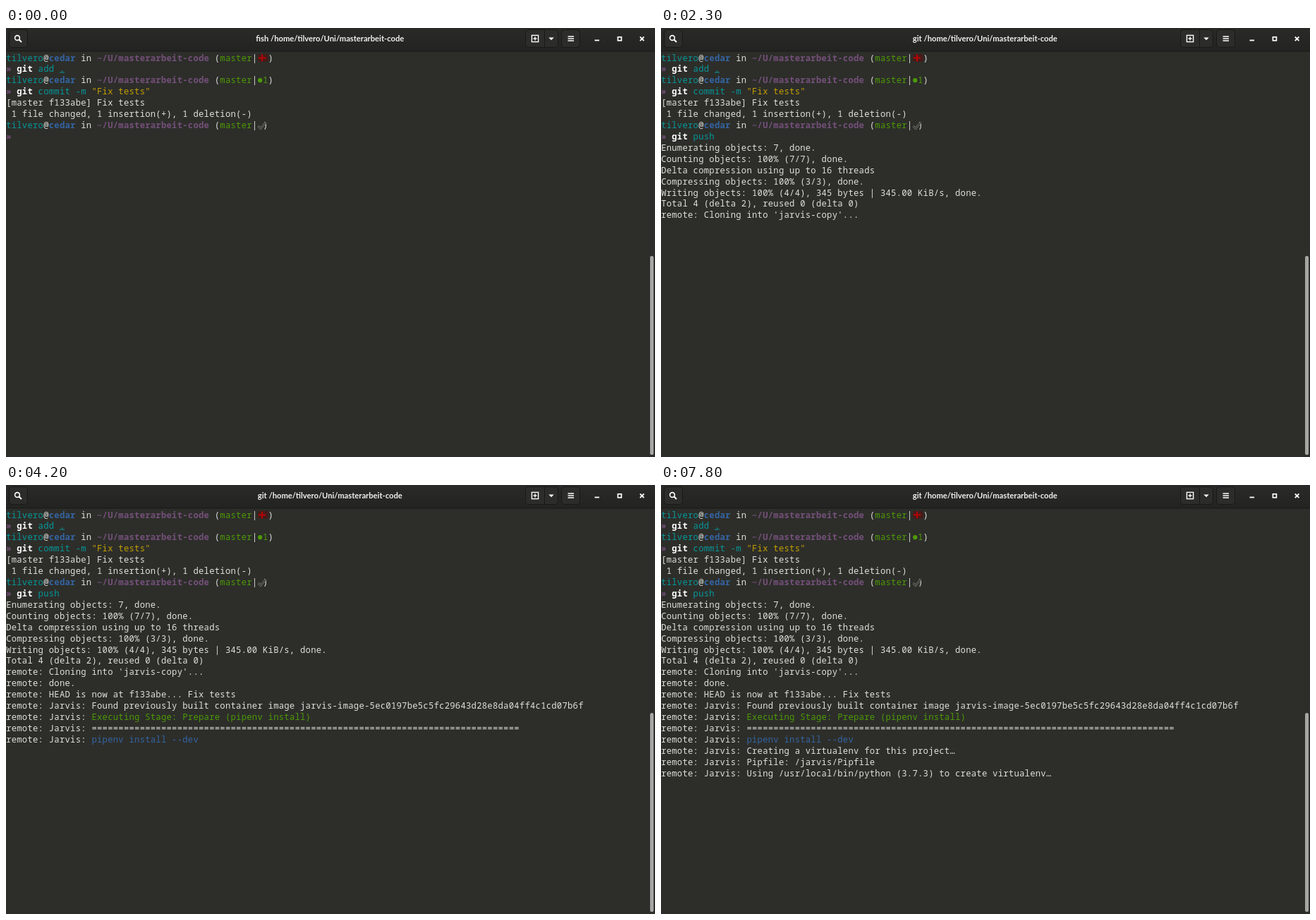
An HTML page with a canvas that plays this animation: 920x608 px, repeating every 8 s.

```html
<!DOCTYPE html>
<html lang="en">
<head>
<meta charset="utf-8">
<title>Terminal</title>
<style>
  html, body { margin: 0; width: 920px; height: 608px; overflow: hidden; background: #2d2e2a; }
  canvas { display: block; }
</style>
</head>
<body>
<canvas id="stage" width="920" height="608"></canvas>
<script>
const ctx = document.getElementById('stage').getContext('2d');
const LOOP = 8000, CELL = 7.58, LINE = 15.92, TOP = 34, BASELINE = 12.5;
const BG = '#2d2e2a', FG = '#dfe0dc', WHITE = '#ffffff', GHOST = '#62645f';
const CYAN = '#06989a', BLUE = '#3465a4', PURPLE = '#75507b', GREEN = '#4e9a06', YELLOW = '#c4a000', RED = '#cc0000';
const USER = 'tilvero', HOST = 'cedar';

// A span is [text, colour, bold]; a line is a list of spans.
const prompt = status => [
  [USER, CYAN], ['@', FG], [HOST, BLUE, true], [' in ', FG],
  ['~/U/masterarbeit-code', PURPLE, true], [' (', FG], ['master', GREEN], ['|', FG], ...status, [')', FG]
];
const command = (...spans) => [['» ', PURPLE, true], ...spans];
const git = ['git ', WHITE, true];
const remote = (text, colour = FG) => [['remote: ' + text, colour]];
const jarvis = (text, colour = FG) => [['remote: Jarvis: ', FG], [text, colour]];

const history = [
  prompt([['  ', FG]]),
  command(git, ['add .', CYAN]),
  prompt([[' 1', GREEN]]),
  command(git, ['commit -m ', CYAN], ['"Fix tests"', YELLOW]),
  [['[master f133abe] Fix tests', FG]],
  [[' 1 file changed, 1 insertion(+), 1 deletion(-)', FG]],
  prompt([[' ', FG]])
];

const output = [
  [2100, [
    'Enumerating objects: 7, done.',
    'Counting objects: 100% (7/7), done.',
    'Delta compression using up to 16 threads',
    'Compressing objects: 100% (3/3), done.',
    'Writing objects: 100% (4/4), 345 bytes | 345.00 KiB/s, done.',
    'Total 4 (delta 2), reused 0 (delta 0)'
  ].map(text => [[text, FG]])],
  [2300, [remote("Cloning into 'jarvis-copy'...")]],
  [2400, [remote('done.')]],
  [2500, [remote('HEAD is now at f133abe... Fix tests')]],
  [3200, [
    jarvis('Found previously built container image jarvis-image-5ec0197be5c5fc29643d28e8da04ff4c1cd07b6f'),
    jarvis('Executing Stage: Prepare (pipenv install)', GREEN),
    jarvis('='.repeat(80)),
    jarvis('pipenv install --dev', BLUE)
  ]],
  [6400, [
    jarvis('Creating a virtualenv for this project…'),
    jarvis('Pipfile: /jarvis/Pipfile'),
    jarvis('Using /usr/local/bin/python (3.7.3) to create virtualenv…')
  ]]
];

const typing = [[0, ''], [300, 'g'], [400, 'gi'], [600, 'git '], [800, 'git p'], [900, 'git pu'], [1000, 'git push']];
const cursorToggles = [300, 1800, 2400, 3000, 3600, 4200, 4800, 5400, 6000, 7000, 7200, 7800];

function drawLine(spans, row) {
  let col = 0;
  ctx.textAlign = 'center';
  for (const [text, colour, bold] of spans) {
    ctx.font = `${bold ? 'bold ' : ''}12.2px "Noto Sans Mono", monospace`;
    ctx.fillStyle = colour;
    for (const char of text) ctx.fillText(char, (col++ + 0.5) * CELL, TOP + row * LINE + BASELINE);
  }
}

function rect(x, y, w, h, colour) {
  ctx.fillStyle = colour;
  ctx.fillRect(x, y, w, h);
}

function stroke(points, colour, width = 1.8) {
  ctx.beginPath();
  for (const [x, y] of points) ctx.lineTo(x, y);
  ctx.strokeStyle = colour;
  ctx.lineWidth = width;
  ctx.stroke();
}

function disc(x, y, r, colour) {
  ctx.beginPath();
  ctx.arc(x, y, r, 0, 7);
  ctx.fillStyle = colour;
  ctx.fill();
}

function rounded(x, y, w, h, r, fill, border) {
  ctx.beginPath();
  ctx.roundRect(x, y, w, h, r);
  ctx.fillStyle = fill;
  ctx.fill();
  if (!border) return;
  ctx.strokeStyle = border;
  ctx.lineWidth = 1;
  ctx.stroke();
}

function drawHeader(program) {
  const shade = ctx.createLinearGradient(0, 0, 0, 33);
  shade.addColorStop(0, '#2a2b28');
  shade.addColorStop(1, '#232421');
  rect(0, 0, 920, 33, shade);
  rect(0, 32.5, 920, 1, '#191a18');
  for (const [x, w] of [[4.5, 26], [736.5, 46], [787.5, 26]]) rounded(x, 2.5, w, 25, 4, '#2c2d2a', '#191a18');
  rect(763, 3, 1, 24, '#191a18');

  // Search
  ctx.beginPath();
  ctx.arc(16, 14, 3.4, 0, 7);
  ctx.strokeStyle = WHITE;
  ctx.lineWidth = 1.6;
  ctx.stroke();
  stroke([[18.3, 16.3], [22, 20]], WHITE, 2);

  // New tab, its arrow, and the menu
  ctx.lineWidth = 1.4;
  ctx.strokeRect(745.4, 10.4, 9.2, 9.2);
  rect(747.4, 14.3, 5.2, 1.4, WHITE);
  rect(749.3, 12.4, 1.4, 5.2, WHITE);
  ctx.beginPath();
  ctx.moveTo(769.3, 13.5);
  ctx.lineTo(776.7, 13.5);
  ctx.lineTo(773, 17.3);
  ctx.fill();
  for (const y of [11.3, 14.3, 17.3]) rect(796.5, y, 8.5, 1.5, WHITE);

  // Window controls
  rect(834.5, 16.6, 6.5, 1.8, WHITE);
  ctx.lineWidth = 1.7;
  ctx.strokeRect(867.4, 12.8, 5, 5);
  stroke([[898.8, 12.5], [904.4, 18.1]], WHITE);
  stroke([[904.4, 12.5], [898.8, 18.1]], WHITE);

  ctx.font = 'bold 11.2px Lato, sans-serif';
  ctx.textAlign = 'center';
  ctx.fillStyle = '#f2f2f0';
  ctx.fillText(`${program} /home/${USER}/Uni/masterarbeit-code`, 459.3, 19.2);
}

function drawStatusMarks() {
  rounded(357, 37, 15, 11, 3, '#451c1a');
  rect(358, 41.4, 10, 2, '#b80404');
  rect(362, 37.5, 2, 9.8, '#b80404');
  disc(360.2, 74.2, 3.1, GREEN);
  const check = [[357.5, 139], [361, 142.3], [368.5, 133.5]];
  stroke(check, '#868783', 2.6);
  stroke(check, '#2b2c28', 1.2);
  rect(76, 62.5, 7, 1, CYAN);
}

function drawTyping(time, cursorOn) {
  const typed = typing.filter(([at]) => at <= time).pop()[1];
  if (!typed) return drawLine(command(), 7);
  const spans = typed.length < 4 ? [[typed, RED]] : [git, [typed.slice(4), CYAN]];
  const suggestion = typed.length > 4 ? 'git push' : 'git commit -m "Fix tests"';
  const rest = suggestion.slice(typed.length);
  const active = cursorOn && time < 1500;
  if (active) drawCursor(typed.length + 2, 7);
  drawLine(command(...spans, [rest.slice(0, 1), active ? BG : GHOST], [rest.slice(1), GHOST]), 7);
}

function drawCursor(col, row) {
  rect(col * CELL, TOP + row * LINE, CELL, LINE, '#f0f0ee');
}

function draw(time) {
  const cursorOn = cursorToggles.filter(at => at <= time).length % 2 === 1;
  rect(0, 0, 920, 608, BG);
  drawHeader(time < 1200 ? 'fish' : 'git');
  history.forEach(drawLine);
  drawStatusMarks();
  drawTyping(time, cursorOn);

  let row = 8;
  for (const [at, lines] of output) {
    if (at <= time) for (const line of lines) drawLine(line, row++);
  }
  if (cursorOn && time >= 1500) drawCursor(0, row);
  rounded(913, 323, 5, 282, 2.5, '#a6a7a3');
}

function tick() {
  draw(performance.now() % LOOP);
  requestAnimationFrame(tick);
}
tick();
</script>
</body>
</html>
```
